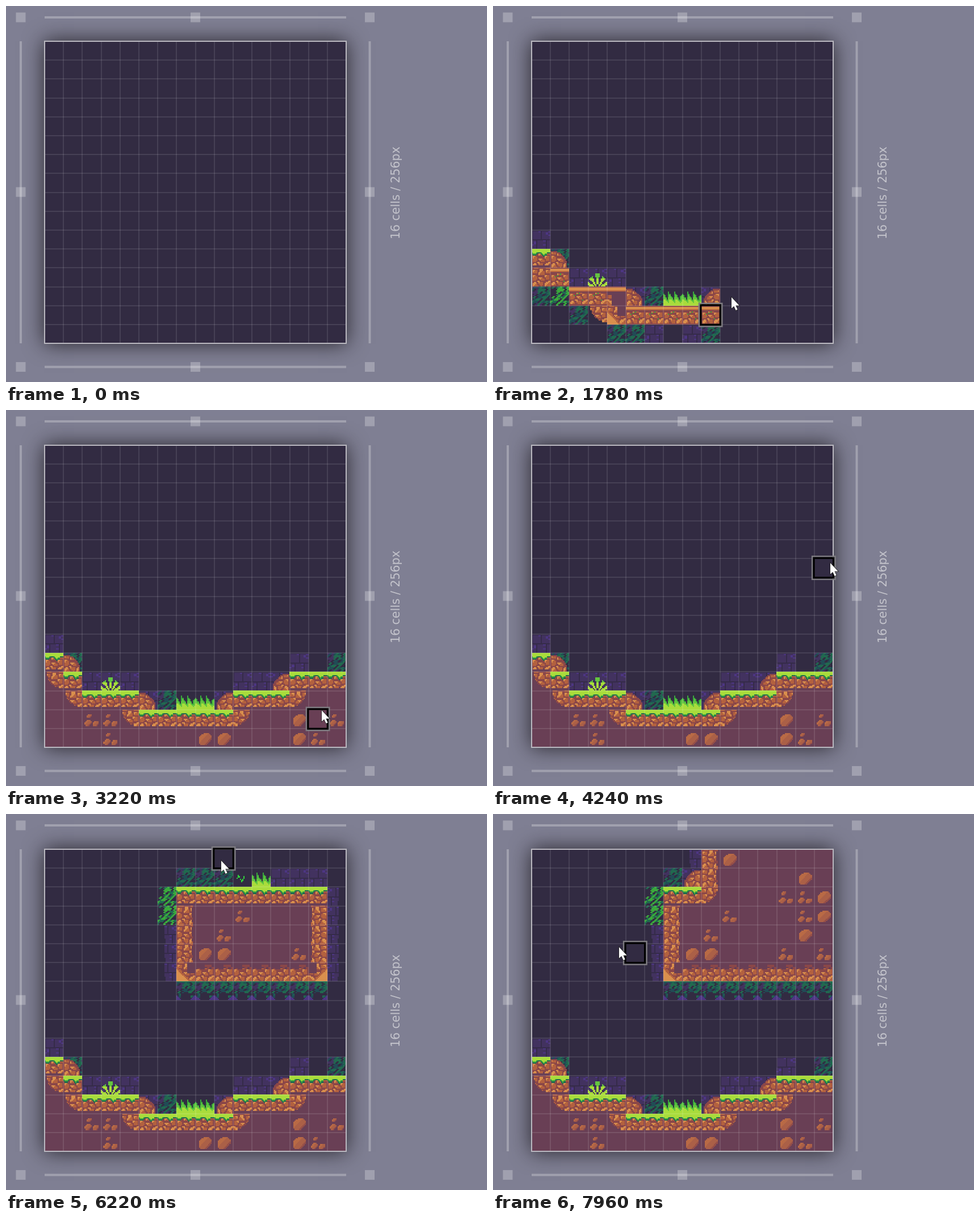
An HTML page with a canvas for the animation above (8 s loop, 847x661 px).

```html
<!DOCTYPE html>
<html lang="en">
<head>
<meta charset="utf-8">
<title>Tile painting</title>
<style>
html, body { margin: 0; width: 100%; height: 100%; overflow: hidden; background: #7f7f93; }
svg, canvas { position: absolute; left: 0; top: 0; }
#panel {
  position: absolute; left: 67px; top: 61px; width: 529px; height: 529px;
  background: #322b42; border: 2px solid #bab8c0;
  box-shadow: 0 0 34px rgba(20, 16, 20, .8);
}
text { font: 20.5px "DejaVu Sans", sans-serif; fill: #c3c3cb; fill-opacity: 1; }
</style>
</head>
<body>
<div id="panel"></div>
<svg id="rulers" width="847" height="661" fill="#fff" fill-opacity=".26">
  <text transform="translate(692.5 410) rotate(-90)">16 cells / 256px</text>
</svg>
<canvas id="stage" width="847" height="661"></canvas>
<script>
const LEFT = 67.7, TOP = 61.7, CELL = 33.2, LOOP = 8000, STEP = 60;
const ctx = document.getElementById('stage').getContext('2d');

// Rulers and handles
const rulers = document.getElementById('rulers');
function rect(x, y, w, h) {
  const r = document.createElementNS('http://www.w3.org/2000/svg', 'rect');
  Object.entries({ x, y, width: w, height: h }).forEach(([k, v]) => r.setAttribute(k, v));
  rulers.append(r);
}
for (const y of [20, 634.5]) rect(68, y - 2, 531, 4);
for (const x of [26, 640.5]) rect(x - 2, 62, 4, 531);
for (const x of [26, 333.5, 640.5])
  for (const y of [20, 327, 634.5])
    if (x !== 333.5 || y !== 327) rect(x - 8.5, y - 8.5, 17, 17);

// Tile colours
const soil = '#693f55', crack = '#8b4748', rock = '#b3613f', light = '#d98f4d';
const lime = '#a9dc3c', green = '#3aa83c', leaf = '#21694f', teal = '#214c55';
const violet = '#4d3683', brickTone = '#42325f', mortar = '#352b49';

const rnd = (x, y) => {
  const v = Math.sin(x * 12.9898 + y * 78.233 + 4) * 43758.5453;
  return v - Math.floor(v);
};

function cobble(x, y) {
  const size = 16 / 3, near = [];
  for (let j = -1; j < 2; j++) for (let i = -1; i < 2; i++) {
    const cx = Math.floor(x / size) + i, cy = Math.floor(y / size) + j;
    const wx = (cx + 3) % 3, wy = (cy + 3) % 3;
    const dx = x - (cx + .25 + rnd(wx, wy) * .5) * size;
    const dy = y - (cy + .25 + rnd(wy + 5, wx) * .5) * size;
    near.push([Math.hypot(dx, dy), dx + dy]);
  }
  near.sort((a, b) => a[0] - b[0]);
  return near[1][0] - near[0][0] < 1.2 ? crack : near[0][1] < -1 ? light : rock;
}

function brick(x, y) {
  const row = y >> 3, bx = (x + row * 4) % 8;
  if (y % 8 === 0 || bx === 0) return mortar;
  return y % 8 < 5 && bx > 3 && rnd(x >> 1, y >> 1) > .5 ? violet : brickTone;
}

function foliage(x, y) {
  const r = rnd((x + y) >> 1, y >> 1);
  return r > .74 ? leaf : r > .52 ? teal : r > .36 ? brickTone : null;
}

function pebbles(list) {
  return (x, y) => {
    for (const [cx, cy, r] of list) {
      const dx = x - cx, dy = y - cy;
      if (Math.hypot(dx, dy * 1.1 + dx * .25) < r)
        return dx + dy > r * .7 ? '#964f48' : dx + dy < -r * .3 ? '#b96a45' : '#ab6047';
    }
    return soil;
  };
}

function path(x, y) {
  if (y < 5) return [crack, light, light, rock, '#7c4450'][y];
  if (rnd(x, y) > .97) return green;
  return y < 15 ? cobble(x, y) : crack;
}

const slope = back => (x, y) => {
  const d = Math.hypot(x, 15 - y);
  return d < 13 ? cobble(x, y) : d < 14 ? crack : back(x, y);
};
const under = back => (x, y) => Math.hypot(15 - x, y) < 13.5 ? cobble(x, y) : back;
const mirror = tile => (x, y) => tile(15 - x, y);

const tiles = {
  P: brick,
  F: foliage,
  B: (x, y) => {
    const r = rnd((x + y) >> 1, y >> 1);
    return r > .7 + (x > 9) * .14 ? green : r > .55 ? leaf : x > 10 && r > .3 ? mortar : null;
  },
  V: (x, y) => {
    const lean = x + (16 - y) / 4, side = Math.abs(lean % 5 - 2);
    const h = 11 - 3 * side + rnd(lean / 5 | 0, 3) * 2;
    return y < 16 - h ? null : y > 17 - h * .6 ? lime : y > 16 - h * .8 ? '#63c43f' : green;
  },
  W: (x, y) => {
    const dx = x - 7.5, dy = 17 - y, angle = Math.atan2(dx, dy);
    const lit = Math.hypot(dx, dy) < 12.5 - Math.abs(angle) * 3 && Math.cos(angle * 11) > -.2;
    return lit ? y > 8 ? lime : '#63c43f' : brick(x, y);
  },
  y: (x, y) => x > 2 && x < 10 && Math.abs(y - 8.5 - 2 * Math.sin(x * 1.1)) < .8 ? '#2fd43a' : null,
  G: (x, y) => {
    const wave = Math.sin(x * Math.PI / 4), edge = Math.round(4.6 + 1.4 * wave + rnd(x, 9));
    if (y < 3 || y < edge - 2) return lime;
    if (y < edge) return y === edge - 1 ? leaf : green;
    return y < 14 - (x % 5 === 0) ? cobble(x, y) : soil;
  },
  T: path,
  O: cobble,
  n: (x, y) => y < 4 ? path(x, y) : x > 11 && y > 6 ? cobble(x, y) : soil,
  s: slope(brick),
  t: slope(foliage),
  u: under(null),
  i: under(soil),
  c: (x, y) => {
    const d = x + 15 - y;
    return d < 10 ? light : d < 12 ? rock : x < 9 || y > 8 ? cobble(x, y) : soil;
  },
  e: (x, y) => x < 12 + rnd(y >> 1, 2) * 2 ? cobble(x, y) : soil,
  b: (x, y) => y > 4 + rnd(x >> 1, 6) * 2 ? cobble(x, y) : y > 1 && rnd(x >> 1, y >> 1) > .7 ? crack : soil,
  h: (x, y) => {
    if (y > 11 && Math.abs(x - 7.5) > 19 - y) return violet;
    return y < 1 ? leaf : y < 8 + rnd(x >> 1, 5) * 8 ? foliage(x, y) : null;
  },
  q: (x, y) => x > 3 + rnd(y >> 2, 7) * 4 ? brick(x, y) : null,
  o: () => soil,
  k: pebbles([[5.5, 5, 2.1], [4.5, 10.8, 2.7], [11.2, 11.5, 2.5]]),
  K: pebbles([[7.8, 8.5, 5.6]])
};
for (const [to, from] of ['zs', 'vu', 'ji', 'dc', 're', 'pq', 'Nn']) tiles[to] = mirror(tiles[from]);

const sprites = {};
for (const key in tiles) {
  const c = sprites[key] = document.createElement('canvas');
  c.width = c.height = 16;
  const g = c.getContext('2d');
  for (let y = 0; y < 16; y++) for (let x = 0; x < 16; x++) {
    const tone = tiles[key](x, y);
    if (tone) { g.fillStyle = tone; g.fillRect(x, y, 1, 1); }
  }
}

// Tile maps: first row, then the rows
const trail = [10,
  'P...............',
  'Gt...........P.F',
  'OTPWP.....PPznTT',
  'FBTTNsFVVznTTdvF',
  '..FucTTTTTdv.F..',
  '....FFP.PFP.....'];
const ground = [10,
  'P...............',
  'Gt...........P.F',
  'iGPWP.....PPzGGG',
  'oiGGGsFVVzGGGjoo',
  'ookkiGGGGGjooKok',
  'oookooooKKoooKko'];
const island = [1,
  '.......FFFyVPPP.',
  '......BGGGGGGGGp',
  '......Beookooorp',
  '......qeokoooorp',
  '......qeKKoookrp',
  '......qcbbbbbbdp',
  '.......hhhhhhhh.'];
const cliff = [0,
  '........qeKooooo',
  '.......FzeooooKo',
  '......BGGjoookkK',
  '......BeookoookK',
  '......qeokooooKo',
  '......qeKKoookok',
  '......qcbbbbbbbb',
  '.......hhhhhhhhh'];

const world = document.createElement('canvas');
world.width = world.height = 256;
const wctx = world.getContext('2d');
function drawMap([first, ...rows], lastCol = 15) {
  rows.forEach((row, j) => [...row].forEach((key, i) => {
    if (i <= lastCol && sprites[key]) wctx.drawImage(sprites[key], i * 16, (first + j) * 16);
  }));
}

// Pointer: time, x, y
const keys = [
  [100, 797, 128], [280, 797, 128], [1060, 97, 451], [1120, 97, 451], [1180, 102, 471],
  [1240, 136, 498], [1420, 232, 515], [1480, 262, 540], [1700, 388, 542], [1780, 420, 512],
  [1900, 490, 506], [1960, 514, 488], [2200, 552, 484], [2680, 594, 488], [2740, 597, 490],
  [2860, 575, 508], [2920, 552, 528], [3160, 551, 528], [3220, 556, 528], [3640, 556, 528],
  [4180, 593, 274], [4240, 594, 269], [4360, 594, 283], [4540, 594, 283], [4600, 598, 285],
  [4720, 560, 283], [5320, 377, 165], [5380, 368, 162], [5440, 350, 148], [5620, 315, 134],
  [5740, 315, 134], [6100, 376, 84], [6220, 379, 82], [7000, 619, 258], [7120, 612, 272],
  [7240, 612, 272], [7840, 280, 238], [7960, 222, 234]];

function pointer(t) {
  const n = keys.findIndex(k => k[0] >= t);
  if (n < 1) return keys[n < 0 ? keys.length - 1 : 0].slice(1);
  const [t0, x0, y0] = keys[n - 1], [t1, x1, y1] = keys[n], f = (t - t0) / (t1 - t0);
  return [x0 + (x1 - x0) * f, y0 + (y1 - y0) * f];
}

const drags = [
  { from: 4720, to: 5740, col: 14, row: 6 },
  { from: 6220, to: 7240, col: 9, row: 0 }];

function drawSelection(t, [col, row]) {
  const drag = drags.find(d => t > d.from && t < d.to);
  if (!drag && (col < 0 || col > 15 || row < 0 || row > 15)) return;
  col = Math.min(15, Math.max(0, col));
  row = Math.min(15, Math.max(0, row));
  const { col: c0, row: r0 } = drag || { col, row };
  const frame = (grow, width, tone) => {
    ctx.lineWidth = width;
    ctx.strokeStyle = tone;
    ctx.strokeRect(LEFT + Math.min(col, c0) * CELL - grow, TOP + Math.min(row, r0) * CELL - grow,
      (Math.abs(col - c0) + 1) * CELL + 2 * grow, (Math.abs(row - r0) + 1) * CELL + 2 * grow);
  };
  frame(3.6, 2.5, '#7d7b80');
  frame(.6, 3.2, '#000');
}

const arrow = new Path2D('M0 0V19.5L4.3 15.7L7.6 23L10.6 21.6L7.4 14.6H13.6Z');
function drawPointer([x, y]) {
  ctx.save();
  ctx.translate(Math.round(x), Math.round(y));
  ctx.lineWidth = 1.5;
  ctx.strokeStyle = '#222';
  ctx.stroke(arrow);
  ctx.fillStyle = '#fff';
  ctx.fill(arrow);
  ctx.restore();
}

function drawPanel() {
  ctx.save();
  ctx.beginPath();
  ctx.rect(69, 63, 529, 529);
  ctx.clip();
  ctx.imageSmoothingEnabled = false;
  ctx.drawImage(world, LEFT, TOP, 16 * CELL, 16 * CELL);
  ctx.fillStyle = 'rgba(255,255,255,.1)';
  for (let i = 1; i < 16; i++) {
    const d = Math.round(i * CELL);
    ctx.fillRect(67 + d, 63, 2, 529);
    ctx.fillRect(69, 61 + d, 529, 2);
  }
  ctx.restore();
}

function draw(now) {
  const time = now % LOOP;
  const t = time < 100 ? 0 : 100 + Math.floor((time - 100) / STEP) * STEP;
  // The selection trails the pointer by one step
  const [bx, by] = pointer(t - STEP);
  const cell = [Math.floor((bx - LEFT) / CELL), Math.floor((by - TOP) / CELL)];

  wctx.clearRect(0, 0, 256, 256);
  if (t >= 2860) drawMap(ground);
  else if (t >= 1240) drawMap(trail, t < 2700 ? cell[0] : 15);
  if (t >= 7240) drawMap(cliff);
  else if (t >= 5740) drawMap(island);

  ctx.clearRect(0, 0, 847, 661);
  drawPanel();
  if (t >= 100) {
    drawSelection(t, cell);
    drawPointer(pointer(t));
  }
  requestAnimationFrame(draw);
}
requestAnimationFrame(draw);
</script>
</body>
</html>
```
